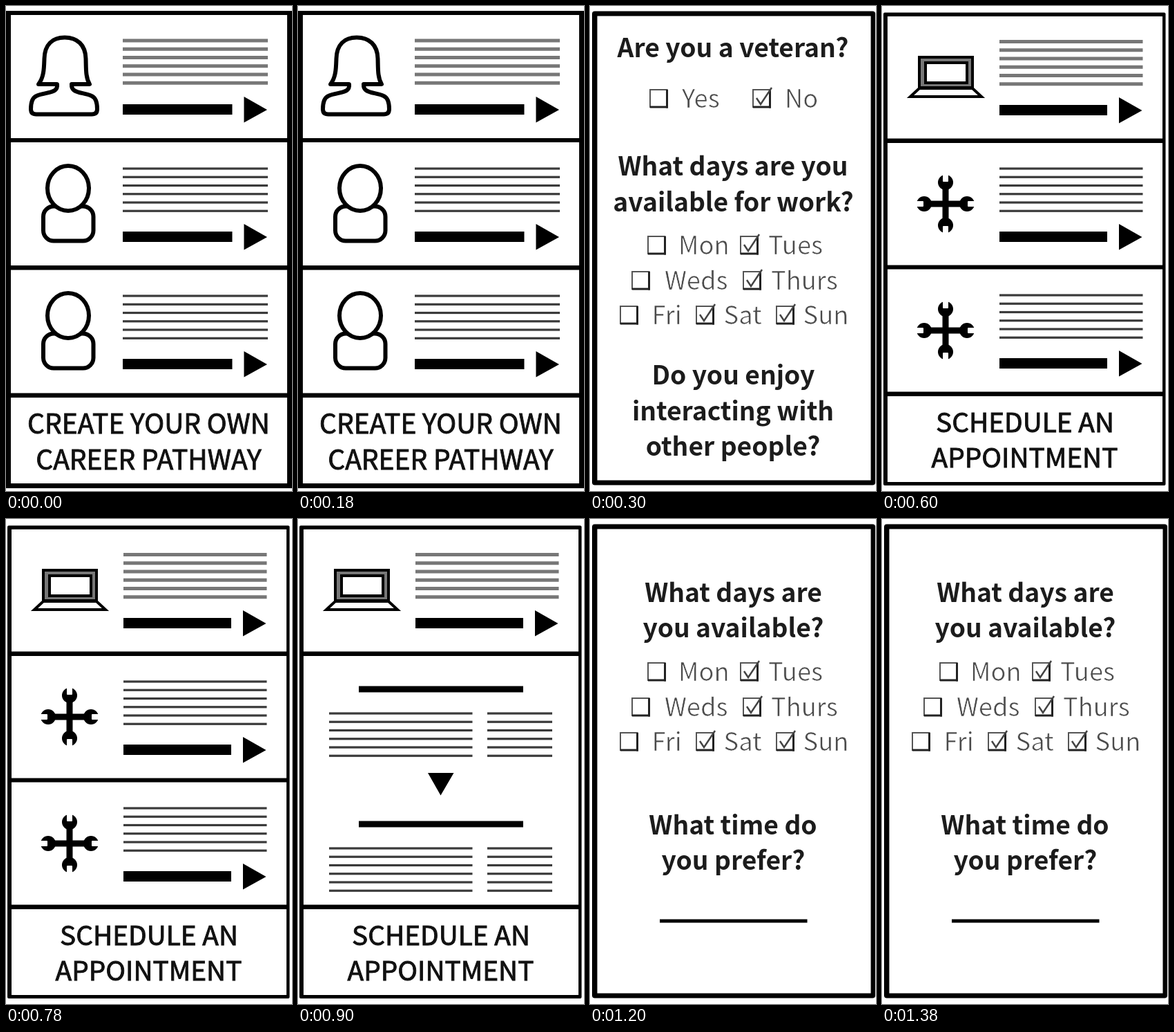
An HTML page that plays this animation: 414x701 px, repeating every 1.5 s.

```html
<!DOCTYPE html>
<html lang="en">
<head>
<meta charset="utf-8">
<title>Career pathway screens</title>
<style>
  html, body { margin: 0; width: 100%; height: 100%; overflow: hidden; background: #fff; }
  svg { display: block; width: 414px; height: 701px; }
  text { font-family: "Noto Sans CJK SC", "Noto Sans CJK JP", "Noto Sans CJK KR", "Noto Sans CJK TC", "Noto Sans CJK", "Noto Sans", sans-serif; }
  .head { font-size: 37.2px; font-weight: 700; fill: #1c1c1c; text-anchor: middle; }
  .foot { font-weight: 400; fill: #111; stroke: #111; stroke-width: .9px; text-anchor: middle; }
  .label { font-size: 36.3px; font-weight: 400; fill: #4a4a4a; stroke: #fff; stroke-width: .7px; }
  .icon { fill: #fff; stroke: #000; stroke-width: 6px; stroke-linejoin: round; }
</style>
</head>
<body>
<svg id="stage" viewBox="0 0 414 701"></svg>
<script>
const LOOP = 1500;

const rect = (x1, y1, x2, y2, fill = '#000', r = 0) =>
  `<rect x="${x1}" y="${y1}" width="${x2 - x1}" height="${y2 - y1}" rx="${r}" fill="${fill}"/>`;
const poly = points => `<polygon points="${points}"/>`;
const text = (cls, x, y, words, size) =>
  `<text class="${cls}" x="${x}" y="${y}"${size ? ` font-size="${size}"` : ''}>${words}</text>`;
const heading = (x, y, words) => text('head', x, y, words);

// Black frame with white panels; rows lists each panel's top and bottom.
const frame = ([x1, y1, x2, y2], left, right, rows, r = 0) =>
  rect(x1, y1, x2, y2, '#000', r) +
  rows.map(([top, bottom]) => rect(left, top, right, bottom, '#fff')).join('');

// Six ruled lines standing in for a paragraph.
function lines(x1, x2, y, weight = 3.2, color = '#3a3a3a') {
  let out = '';
  for (let i = 0; i < 6; i++) {
    const mid = y + i * 12.25;
    out += rect(x1, mid - weight / 2, x2, mid + weight / 2, color);
  }
  return out;
}

// Paragraph, bar and arrow of one list row.
function entry(x1, x2, y, barY, soft) {
  const tip = x2 - 1, back = x2 - 34.5;
  return (soft ? lines(x1, x2, y, 5, '#777') : lines(x1, x2, y)) +
    rect(x1, barY - 7.5, x2 - 51.5, barY + 7.5) +
    poly(`${back},${barY - 18.5} ${tip},${barY + .5} ${back},${barY + 19}`);
}

const woman = `<path class="icon" d="M47 113 C55 103 55 90 55.5 76
  C56 56 67 45.5 85 45.5 S115 56 115.5 76 C116 90 115 103 121 113
  L95 113 C94 127 111 124 124 130 C131 133 132 141 132 149 Q132 156.5 124 156.5
  L44 156.5 Q36 156.5 36 149 C36 141 37 133 44 130 C57 124 76 127 74 113 Z"/>`;

const man = y => `<g class="icon">
  <rect x="54" y="${y + 26}" width="72.5" height="50" rx="15"/>
  <ellipse cx="90" cy="${y}" rx="30" ry="32.5"/></g>`;

const laptop = `<g stroke="#000" stroke-width="4" fill="#fff">
  <rect x="54" y="74" width="77" height="44" fill="#777"/>
  <rect x="63" y="82" width="60" height="29"/>
  ${poly('54,119 131,119 144,131 41,131')}</g>`;

function wrenches(y) {
  let out = `<g transform="translate(92 ${y})">`;
  for (let a = 0; a < 360; a += 90) {
    out += `<g transform="rotate(${a})">${rect(-4.5, -28, 4.5, 2)}
      <circle cy="-31" r="11"/>${rect(-4, -44, 4, -32, '#fff', 1)}</g>`;
  }
  return out + '</g>';
}

function box(x, base, checked) {
  const y = base - 27;
  const tick = `<path d="M${x + 6} ${y + 13} L${x + 12} ${y + 22} L${x + 28} ${y - 2}"
    fill="none" stroke="#444" stroke-width="2.5"/>`;
  return `<rect x="${x + 1}" y="${y + 1}" width="24.5" height="25" fill="none" stroke="#555" stroke-width="2"/>` +
    rect(x + 24, y + 1, x + 27, y + 27.5, '#222') +
    rect(x + 1, y + 24.5, x + 27, y + 27.5, '#222') +
    (checked ? tick : '');
}

// Each choice: box x, label x, label, checked.
const choices = (base, list) => list.map(([bx, tx, word, on]) =>
  box(bx, base, on) + text('label', tx, base, word)).join('');

const days = y =>
  choices(y, [[83, 128, 'Mon'], [217, 258, 'Tues', 1]]) +
  choices(y + 51, [[60, 108, 'Weds'], [221, 262, 'Thurs', 1]]) +
  choices(y + 101, [[43, 89.5, 'Fri'], [153, 193.5, 'Sat', 1], [269, 308.5, 'Sun', 1]]);

const formFrame = frame([3, 7.5, 413, 692.5], 10.5, 406.5, [[14.5, 685.5]], 4);
const listFrame = rows => frame([2, 9.5, 410.5, 693], 8, 406, rows, 2);

const booking =
  text('foot', 207, 616, 'SCHEDULE AN', 38.8) +
  text('foot', 206.5, 667, 'APPOINTMENT', 38.8);
const firstRow = laptop + entry(170, 377.5, 51.5, 150.5, true);

const section = y =>
  rect(88, y - 4.5, 326, y + 4.5) + lines(45, 252.5, y + 35) + lines(274, 368, y + 35);

const scenes = [
  frame([0, 7, 414, 697], 7, 407, [[13, 191], [197, 375], [381.5, 559.5], [566, 690]]) +
    woman + entry(169, 379, 50, 149.5, true) +
    man(263.5) + entry(169, 379, 235, 333.5) +
    man(447.5) + entry(169, 379, 419, 517.5) +
    text('foot', 206.5, 618, 'CREATE YOUR OWN', 39) +
    text('foot', 206.5, 670, 'CAREER PATHWAY', 39),

  formFrame +
    heading(207, 74, 'Are you a veteran?') +
    choices(147, [[86, 133, 'Yes'], [235, 282, 'No', 1]]) +
    heading(207, 245, 'What days are you') +
    heading(207.5, 297, 'available for work?') +
    days(359) +
    heading(207.5, 547, 'Do you enjoy') +
    heading(207, 599, 'interacting with') +
    heading(207, 650, 'other people?'),

  listFrame([[15, 191.5], [198, 374.5], [380.5, 557.5], [564, 688]]) + firstRow +
    wrenches(286) + entry(170, 377.5, 235, 333.5) +
    wrenches(469) + entry(170, 377.5, 418, 516.5) + booking,

  listFrame([[15, 191.5], [198, 557.5], [564, 688]]) + firstRow +
    section(246) + poly('188,367 225.5,367 206.5,399.5') + section(441) + booking,

  formFrame +
    heading(207.5, 120, 'What days are') +
    heading(207.5, 171, 'you available?') +
    days(234) +
    heading(207, 456, 'What time do') +
    heading(207.5, 507, 'you prefer?') +
    rect(101, 578.5, 314.5, 583.5)
];

const stage = document.getElementById('stage');
stage.innerHTML = scenes.map(s => `<g>${s}</g>`).join('');

// Hard cuts: every scene shows for one slot, each a slot later than the last.
const slot = LOOP / scenes.length;
const share = 1 / scenes.length;
[...stage.children].forEach((scene, i) => {
  scene.animate([
    { opacity: 1, offset: 0 }, { opacity: 1, offset: share },
    { opacity: 0, offset: share }, { opacity: 0, offset: 1 }
  ], { duration: LOOP, iterations: Infinity, delay: i * slot - LOOP });
});
</script>
</body>
</html>
```
